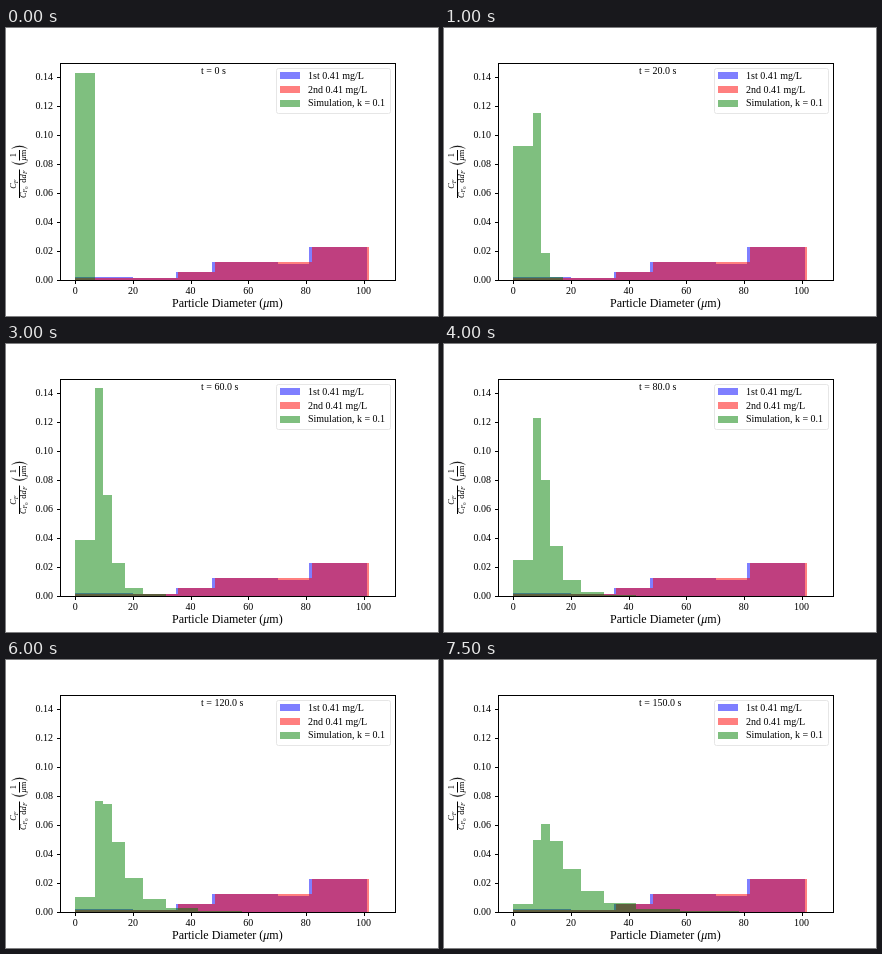
An HTML page for the animation above (8 s loop, 432 by 288 pixels).

```html
<!DOCTYPE html>
<html lang="en">
<head>
<meta charset="utf-8">
<title>Particle size distribution</title>
<style>
  html, body { margin: 0; width: 100%; height: 100%; overflow: hidden; background: #fff; }
  svg { display: block; width: 432px; height: 288px; }
  text { font: 10px "Liberation Serif", "Times New Roman", serif; fill: #000; white-space: pre; }
  .axis { font-size: 12px; }
  .i { font-style: italic; }
  .math text { font-size: 8.4px; }
  .math .sub { font-size: 5.9px; }
  .math .subsub { font-size: 4.4px; }
  .line { fill: none; stroke: #000; stroke-width: 1; }
  .blue { fill: #00f; fill-opacity: .5; }
  .red { fill: #f00; fill-opacity: .5; }
  .green { fill: #008000; fill-opacity: .5; }
</style>
</head>
<body>
<svg viewBox="0 0 432 288">
  <path class="blue" d="M69 252V249H127V250H170V244H206V234H272V236H303V219H361V252Z"/>
  <path class="red" d="M69 252V250H172V244H209V234H306V219H363V252Z"/>
  <path id="bars" class="green"/>

  <path id="ticks" class="line"/>
  <rect class="line" x="54.5" y="35.5" width="335" height="217"/>
  <g id="labels"></g>

  <text id="time" x="195" y="46"></text>
  <text class="axis" x="166" y="279">Particle Diameter (<tspan class="i">μ</tspan>m)</text>

  <g class="math" transform="translate(13 170) rotate(-90)">
    <path class="line" d="M0 .5H28.5M37.5 .5H48"/>
    <text class="i" x="9.2" y="-2.6">C</text>
    <text class="i sub" x="14.8" y="-1.2">F</text>
    <text class="i" x="0" y="7">C</text>
    <text class="i sub" x="5.5" y="8.4">F</text>
    <text class="subsub" x="9.2" y="9.4">0</text>
    <text x="15.2" y="7">d</text>
    <text class="i" x="19.6" y="7">d</text>
    <text class="i sub" x="24" y="8.4">F</text>
    <text x="40.7" y="-2.6">1</text>
    <text x="37.5" y="7"><tspan class="i">μ</tspan>m</text>
    <path d="M36.2 -7.5Q30.4 .5 36.2 8.5Q32.4 .5 36.2 -7.5ZM49.4 -7.5Q55.2 .5 49.4 8.5Q53.2 .5 49.4 -7.5Z" stroke="#000" stroke-width=".2"/>
  </g>

  <rect x="270.5" y="40.5" width="114" height="45" rx="2" fill="#fff" fill-opacity=".8" stroke="#e6e6e6"/>
  <path class="blue" d="M274 44h20v7h-20z"/>
  <path class="red" d="M274 58h20v7h-20z"/>
  <path class="green" d="M274 72h20v7h-20z"/>
  <text x="302" y="51">1st 0.41 mg/L</text>
  <text x="302" y="65">2nd 0.41 mg/L</text>
  <text x="302" y="78">Simulation, k = 0.1</text>
</svg>
<script>
  const $ = id => document.getElementById(id);
  const X0 = 69.23, Y0 = 252, SX = 2.883, SY = 1449.6;
  const px = v => Math.round(X0 + v * SX);
  const py = v => Math.round(Y0 - v * SY);

  function label(str, x, y, anchor) {
    const el = document.createElementNS("http://www.w3.org/2000/svg", "text");
    el.setAttribute("x", x);
    el.setAttribute("y", y);
    el.setAttribute("text-anchor", anchor);
    el.textContent = str;
    $("labels").append(el);
  }

  let ticks = "";
  for (let v = 0; v <= 100; v += 20) {
    ticks += `M${px(v) + .5} 252.5v3.5`;
    label(v, X0 + v * SX, 266, "middle");
  }
  for (let i = 0; i <= 7; i++) {
    const v = i * .02, y = py(v);
    ticks += `M54.5 ${y + .5}h-3.5`;
    label(v.toFixed(2), 47, y + 3, "end");
  }
  $("ticks").setAttribute("d", ticks);

  // Bin edges grow geometrically; mass moves up the bins at a constant rate (Poisson).
  const RATE = .02195, FIRST = 6.997, RATIO = 1.3521, BINS = 10;
  const edge = n => n < 0 ? 0 : FIRST * RATIO ** n;

  function barPath(seconds) {
    const mean = RATE * seconds;
    let mass = Math.exp(-mean), d = "";
    for (let n = 0; n < BINS; n++) {
      const left = edge(n - 1), right = edge(n);
      const top = py(mass / (right - left));
      if (top < Y0) d += `M${px(left)} ${Y0}V${top}H${px(right)}V${Y0}Z`;
      mass *= mean / (n + 1);
    }
    return d;
  }

  const STEP = 500, STEPS = 16;
  const start = performance.now();
  let shown = -1;

  function draw() {
    const step = Math.floor((performance.now() - start) / STEP) % STEPS;
    if (step !== shown) {
      shown = step;
      const seconds = step * 10;
      $("bars").setAttribute("d", barPath(seconds));
      $("time").textContent = `t = ${step ? seconds.toFixed(1) : 0} s`;
    }
    requestAnimationFrame(draw);
  }
  draw();
</script>
</body>
</html>
```
